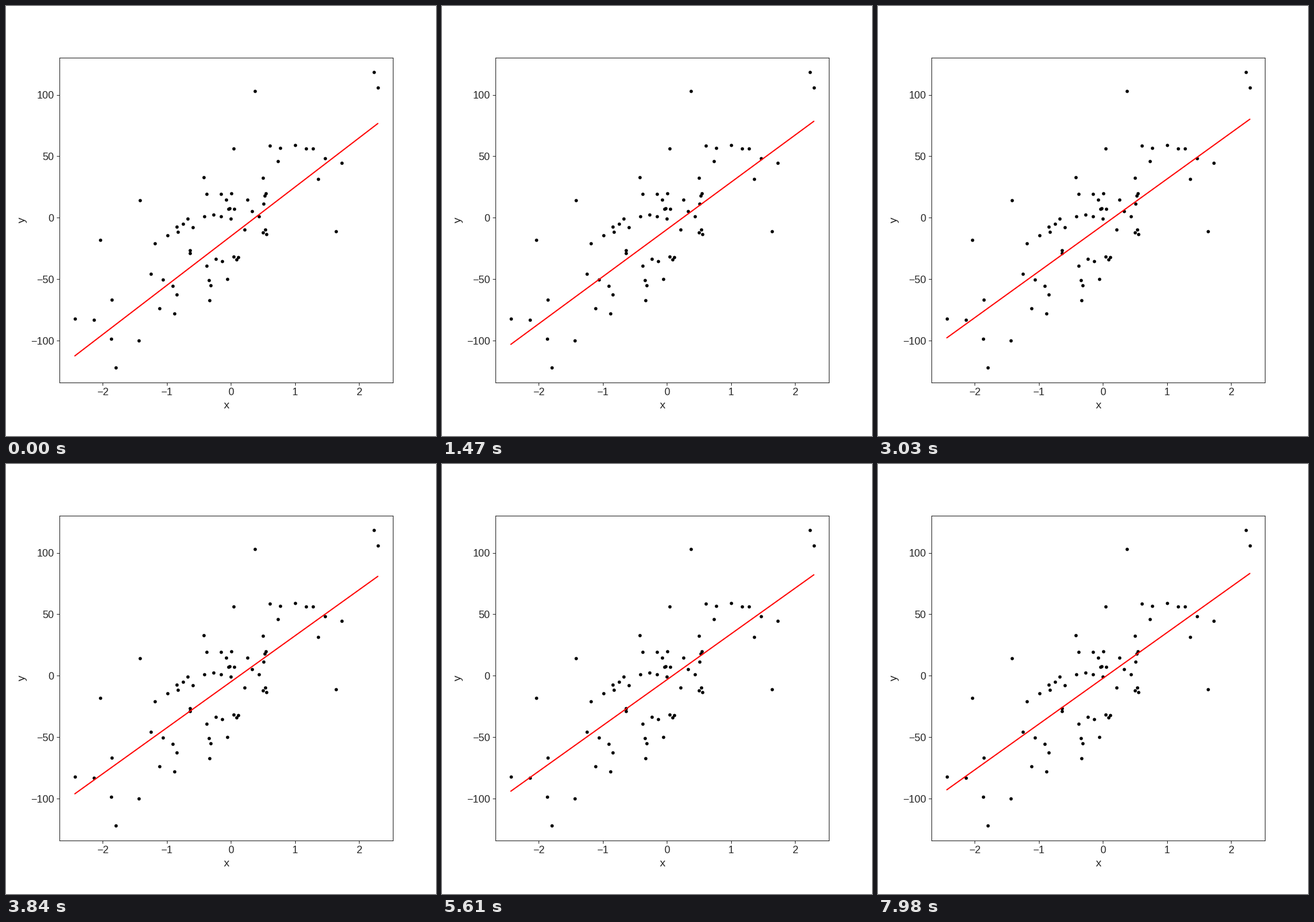
Recreate the animation shown at these times as a matplotlib script. Size 748 by 748 pixels, loop 8 s.

```python
import matplotlib.pyplot as plt
import numpy as np
from matplotlib.animation import FuncAnimation

SIZE, DPI = 748, 100
LOOP_MS, FRAMES = 8000, 267
SAMPLES, NOISE = 70, 30
RATE = 0.01                # learning rate of the descent
START = (40.0, -15.0)      # first slope and bias
INK = "#262626"


def make_data(seed):
    """Noisy points around a straight line with a random slope."""
    rng = np.random.RandomState(seed)
    x = rng.standard_normal(SAMPLES)
    slope = 100 * rng.uniform()
    return x, slope * x + rng.normal(scale=NOISE, size=SAMPLES)


def descend(x, y, steps):
    """Slope and bias before each gradient step on the squared error."""
    slope, bias = START
    path = []
    for _ in range(steps):
        path.append((slope, bias))
        err = slope * x + bias - y
        slope -= RATE * np.mean(err * x)
        bias -= RATE * np.mean(err)
    return path


x, y = make_data(2)
path = descend(x, y, FRAMES)
ends = np.array([x.min(), x.max()])

plt.rcParams.update({
    "font.family": "Liberation Sans",
    "axes.edgecolor": INK, "axes.labelcolor": INK,
    "xtick.color": INK, "ytick.color": INK,
    "xtick.labelsize": 13, "ytick.labelsize": 13, "axes.labelsize": 14,
})
fig = plt.figure(figsize=(SIZE / DPI, SIZE / DPI), dpi=DPI, facecolor="white")
left = bottom = 93.4 / SIZE
ax = fig.add_axes([left, bottom, 0.9 - left, 0.88 - bottom])

ax.scatter(x, y, s=10, c="black", zorder=1)
line, = ax.plot(ends, START[0] * ends + START[1], color="red", lw=1.5,
                solid_capstyle="round", zorder=2)
ax.set(xlabel="x", ylabel="y", xticks=range(-2, 3), yticks=range(-100, 101, 50))


def draw(i):
    slope, bias = path[i]
    line.set_ydata(slope * ends + bias)
    return line,


anim = FuncAnimation(fig, draw, frames=FRAMES, init_func=lambda: draw(0),
                     interval=LOOP_MS / FRAMES, repeat=True, repeat_delay=0)
plt.show()
```
